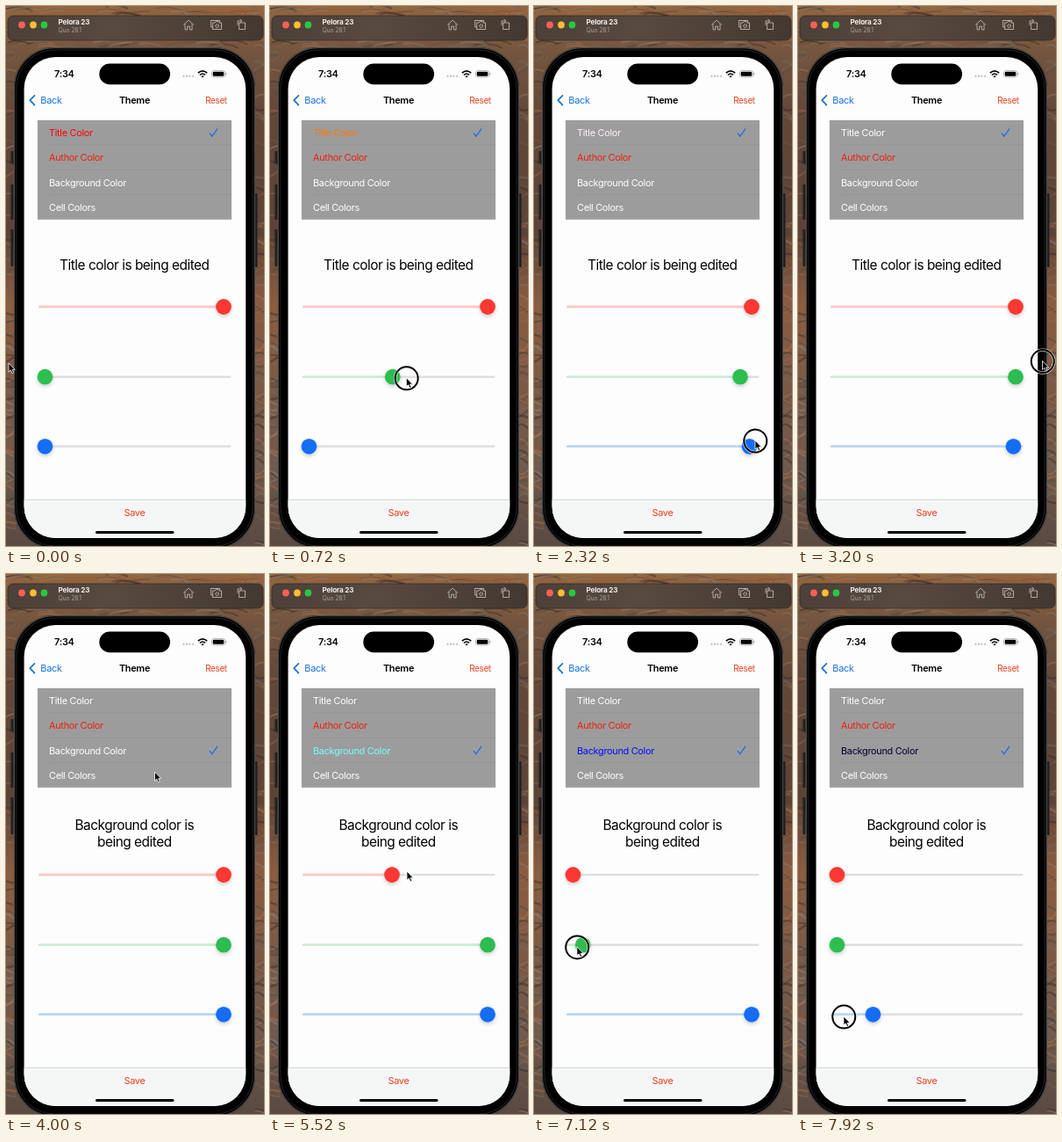
These frames come from a looping animation (294x614 px, 8 s). An HTML page:

```html
<!DOCTYPE html>
<html lang="en">
<meta charset="utf-8">
<title>Theme editor</title>
<style>
html, body { margin: 0; width: 100%; height: 100%; overflow: hidden; background: #684f42 }
svg { display: block; width: 294px; height: 614px }
text { font: 10.9px Inter, sans-serif; letter-spacing: -.027em }
.mid { text-anchor: middle }
.bold { font-weight: 600 }
.accent { fill: #ef3c1c }
#headings text { font-size: 15.4px; letter-spacing: -.031em }
.line { fill: none; stroke-linecap: round; stroke-linejoin: round }
</style>
<svg viewBox="0 0 294 614">
  <defs>
    <linearGradient id="rock" x2="0" y2="1">
      <stop offset="0" stop-color="#94663f"/>
      <stop offset=".08" stop-color="#75563f"/>
      <stop offset=".2" stop-color="#62483b"/>
      <stop offset=".42" stop-color="#5c4337"/>
      <stop offset=".55" stop-color="#8b5c40"/>
      <stop offset=".68" stop-color="#7d5a46"/>
      <stop offset=".85" stop-color="#6f5a4d"/>
      <stop offset="1" stop-color="#5a4a41"/>
    </linearGradient>
    <linearGradient id="bar">
      <stop offset="0" stop-color="#4c4039"/>
      <stop offset=".4" stop-color="#574a3f"/>
      <stop offset="1" stop-color="#443832"/>
    </linearGradient>
    <filter id="shade" x="-50%" y="-50%" width="200%" height="200%">
      <feDropShadow dx="0" dy="2" stdDeviation="2" flood-opacity=".2"/>
    </filter>
  </defs>

  <rect width="294" height="614" fill="url(#rock)"/>
  <g id="streaks" class="line"></g>

  <!-- simulator title bar -->
  <rect x="2" y="11" width="291" height="28" rx="6" fill="url(#bar)" stroke="#2c2420" stroke-width=".6"/>
  <circle cx="18" cy="21.5" r="3.9" fill="#ff5f57"/>
  <circle cx="31" cy="21.5" r="3.9" fill="#febc2e"/>
  <circle cx="43.5" cy="21.5" r="3.9" fill="#28c840"/>
  <text x="59.5" y="20.5" fill="#f2eeec" style="font-size:8.2px;font-weight:700">Pelora 23</text>
  <text x="59.5" y="29.8" fill="#aaa09b" style="font-size:6.9px">Quo 28.1</text>
  <g class="line" stroke="#b3aaa5">
    <path d="M202.500 21.200l5.500-5 5.500 5M204 20.500v6.500h2.700v-4h2.600v4h2.700v-6.500"/>
    <path d="M235 24h-1.500v-7.500h10v1.500M236 19h2l1-1.300h3l1 1.300h2.500v7.500h-9.500z"/>
    <circle cx="240.600" cy="22.700" r="1.800"/>
    <path d="M266 19h6.500v7.500h-6.500zM264 21.500v-4.500h4.500M266.800 15l2 2-2 2"/>
  </g>

  <!-- phone -->
  <path d="M7 165v14M7 203v40M7 254v42M285 213v84" stroke="#242020" stroke-width="3"/>
  <rect x="9" y="47" width="275" height="570" rx="46" fill="#000"/>
  <rect x="9.600" y="47.600" width="273.800" height="568.800" rx="45.400" fill="none" stroke="#4a4949" stroke-width="1.200"/>
  <rect x="12" y="50" width="269" height="564" rx="43" fill="none" stroke="#232324"/>
  <clipPath id="glass"><rect x="20.600" y="58" width="252.600" height="547" rx="36"/></clipPath>
  <g clip-path="url(#glass)">
    <rect x="20" y="58" width="254" height="547" fill="#fdfdfd"/>
    <rect x="20" y="561.500" width="254" height="44" fill="#f5f7f7"/>
    <path d="M20 561.500h254" stroke="#cfd1d1" stroke-width=".8"/>
  </g>
  <rect x="106.300" y="65.600" width="80.700" height="23.600" rx="11.800" fill="#000"/>
  <text class="mid bold" x="66.300" y="81">7:34</text>
  <path class="line" d="M202.500 79.800h11" stroke="#b9b9bb" stroke-width="2.200" stroke-dasharray="0 3.500"/>
  <path d="M218.800 76.200q5.200-4.600 10.400 0M220.900 78.300q3.100-2.600 6.200 0" fill="none" stroke="#000" stroke-width="1.600"/>
  <path d="M222.300 79.800q1.700-1.300 3.400 0l-1.700 1.800z"/>
  <rect x="234.500" y="73.500" width="15" height="7.500" rx="2.300" fill="none" stroke="#a5a5a7" stroke-width=".8"/>
  <rect x="235.700" y="74.700" width="12.600" height="5.100" rx="1.400"/>
  <path d="M250.700 76v2.500" stroke="#a5a5a7"/>

  <path class="line" d="M32.500 101.800l-5.200 5.400 5.200 5.400" stroke="#1674e0" stroke-width="1.700"/>
  <text x="39.300" y="111" fill="#1674e0">Back</text>
  <text class="mid bold" x="146.500" y="111">Theme</text>
  <text class="mid accent" x="239.500" y="110.600" style="font-size:9.800px">Reset</text>

  <rect x="36" y="129.800" width="221" height="113" fill="#9c9c9c"/>
  <path d="M49 157.900h208M49 186.200h208M49 214.500h208" stroke="#919191" stroke-width=".8"/>
  <g fill="#fff">
    <text id="title" x="49" y="148">Title Color</text>
    <text x="49" y="176.300" fill="#f0200c">Author Color</text>
    <text id="back" x="49" y="204.500">Background Color</text>
    <text x="49" y="232.700">Cell Colors</text>
  </g>
  <path id="tick" class="line" d="M232.300 145l2.600 3.200 5.800-8.400" stroke="#2a6ee0" stroke-width="1.400"/>

  <g class="mid" id="headings">
    <text x="146.300" y="300">Title color is being edited</text>
    <g>
      <text x="146.300" y="290.600">Background color is</text>
      <text x="146.300" y="309.700">being edited</text>
    </g>
  </g>
  <g id="sliders"></g>

  <text class="mid accent" x="146.500" y="580">Save</text>
  <rect x="102" y="597" width="89.500" height="3" rx="1.500"/>

  <g id="cursor">
    <g id="ring" fill="none">
      <circle cx=".3" cy=".6" r="13" stroke="#fff" stroke-width="3.400" stroke-opacity=".8"/>
      <circle cx=".3" cy=".6" r="13" stroke="#000" stroke-width="2"/>
    </g>
    <path d="M0 0v10l2.300-2 1.700 3.700 1.700-.8-1.600-3.500h3.100z" stroke="#fff" stroke-width=".8"/>
  </g>
</svg>
<script>
const $ = id => document.getElementById(id);
const LOOP = 8000, STEP = 80, SWITCH = 3760;
const LEFT = 44.5, RIGHT = 248;

// knob x over time: [ms, x]
const sliders = [
  { y: 342, fill: '#fb3830', tint: '#ffc4c5',
    keys: [[4480, RIGHT], [5280, 139], [5680, 139], [6080, LEFT]] },
  { y: 421.7, fill: '#2fbd50', tint: '#c9ebd1',
    keys: [[400, LEFT], [1040, 235], [2800, 235], [3040, RIGHT], [6640, RIGHT], [7200, LEFT]] },
  { y: 500.8, fill: '#176df5', tint: '#b9d6f6',
    keys: [[1360, LEFT], [1520, 54.5], [2320, 245.5], [3360, 245.5], [3520, RIGHT], [7600, RIGHT], [7920, 85.5]] }
];
// pointer: [ms, x, y]
const path = [
  [0, 3, 406], [320, 44, 421], [1040, 235, 424], [1280, 46, 496], [1520, 84, 490],
  [2320, 252, 494], [2720, 236, 422], [3040, 270, 408], [3200, 278.5, 403.5], [3360, 246, 500],
  [3520, 262, 498], [3760, 169, 201], [4000, 169.5, 225], [4400, 248, 342], [5280, 139, 340],
  [5520, 156, 338], [5680, 139, 341], [6080, 40, 344], [6320, 99.5, 366], [6560, 248, 421],
  [7200, 40, 424], [7520, 248, 500], [7920, 52, 503]
];
// spans with the button held
const presses = [[320, 1040], [1280, 2320], [2720, 3200], [3360, 3520], [3680, 3840],
  [4400, 5280], [5680, 6080], [6560, 7200], [7520, 8000]];

function at(keys, t, i = 1) {
  const n = keys.findIndex(k => k[0] > t);
  if (n === 0) return keys[0][i];
  if (n < 0) return keys[keys.length - 1][i];
  const a = keys[n - 1], b = keys[n], u = (t - a[0]) / (b[0] - a[0]);
  return a[i] + (b[i] - a[i]) * u * u * (3 - 2 * u);
}

function add(parent, tag, attrs) {
  const el = document.createElementNS('http://www.w3.org/2000/svg', tag);
  for (const k in attrs) el.setAttribute(k, attrs[k]);
  return parent.appendChild(el);
}

// rock layers showing around the windows
let seed = 7;
const rand = () => (seed = seed * 16807 % 2147483647) / 2147483647;
const tones = ['#a56f4c', '#382b27', '#8d8174', '#8a5338', '#57493f', '#746a62'];
const streak = (d, i) => add($('streaks'), 'path', {
  d, stroke: tones[i % tones.length], 'stroke-width': .8 + rand() * 2, opacity: .5
});
for (let i = 0; i < 170; i++) {
  const x = (i >> 3) % 2 * 285 - 2, y = rand() * 614;
  streak(`M${x} ${y}q5 ${rand() * 12 - 6} 13 ${rand() * 18 - 9}`, i);
}
for (let i = 0; i < 60; i++) {
  const x = rand() * 294, y = i % 2 ? rand() * 10 : 40 + rand() * 7;
  streak(`M${x} ${y}q${8 + rand() * 10} -4 ${15 + rand() * 20} ${rand() * 8 - 4}`, i >> 1);
}

for (const s of sliders) {
  const g = $('sliders');
  add(g, 'rect', { x: 37, y: s.y - 1.3, width: 219.5, height: 2.6, rx: 1.3, fill: '#dfdfe0' });
  s.bar = add(g, 'rect', { x: 37, y: s.y - 1.3, height: 2.6, rx: 1.3, fill: s.tint });
  s.knob = add(g, 'circle', { cy: s.y, r: 8.9, fill: s.fill, filter: 'url(#shade)' });
}

function draw(t) {
  const rgb = sliders.map(s => {
    const x = at(s.keys, t);
    s.knob.setAttribute('cx', x);
    s.bar.setAttribute('width', x === LEFT ? 0 : x - 37);
    return Math.round(255 * (x - LEFT) / (RIGHT - LEFT));
  });
  const color = `rgb(${rgb})`, first = t < SWITCH;
  $('title').style.fill = first ? color : '#fff';
  $('back').style.fill = first ? '#fff' : color;
  $('tick').setAttribute('transform', `translate(0 ${first ? 0 : 56.5})`);
  const [one, two] = $('headings').children;
  one.style.display = first ? '' : 'none';
  two.style.display = first ? 'none' : '';
  $('cursor').setAttribute('transform', `translate(${at(path, t)} ${at(path, t, 2)})`);
  $('ring').style.display = presses.some(([a, b]) => t >= a && t <= b) ? '' : 'none';
}

function frame() {
  draw(Math.floor(performance.now() % LOOP / STEP) * STEP);
  requestAnimationFrame(frame);
}
frame();
</script>
</html>
```
